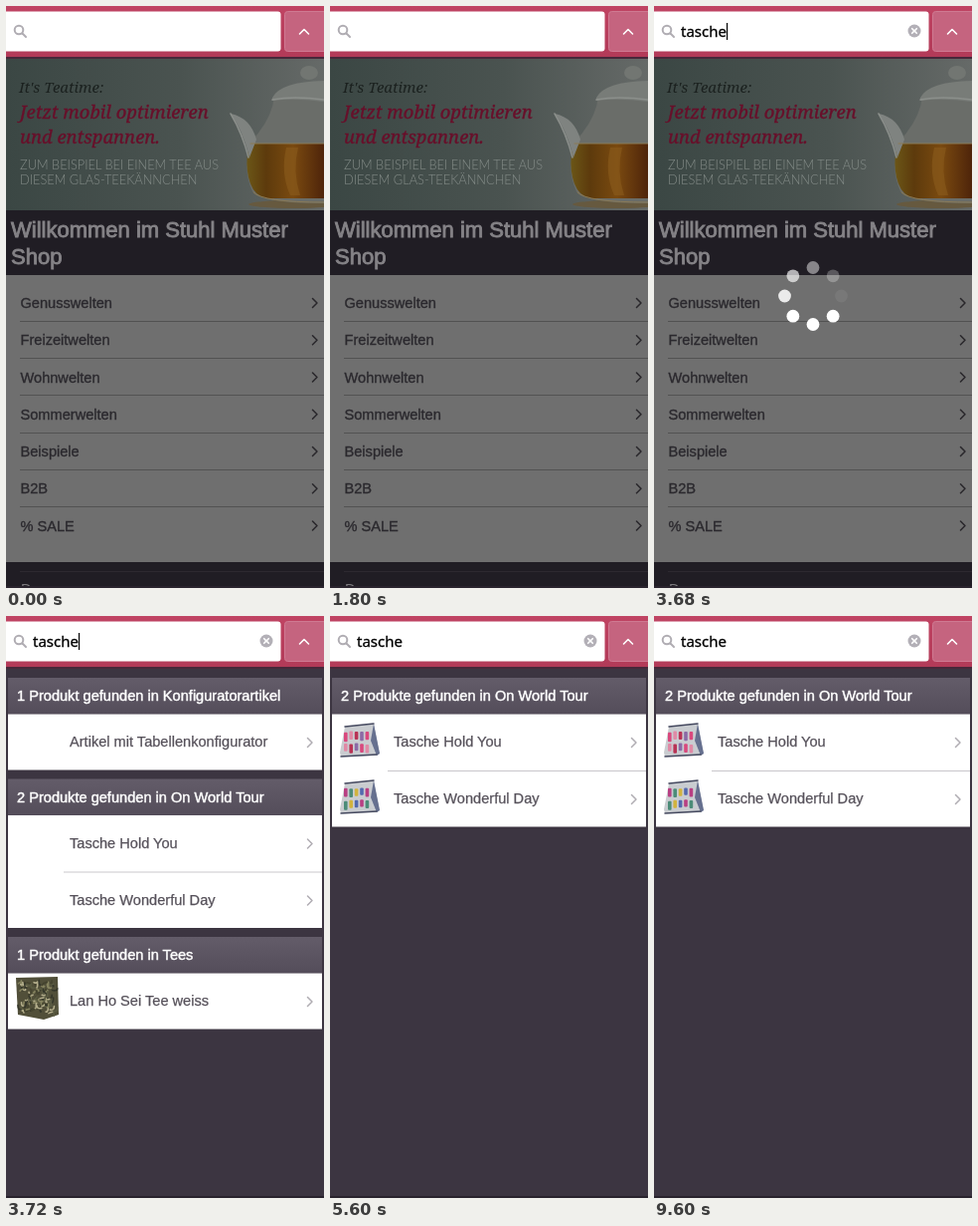
Animation of 320 by 584 pixels, one loop 9640 ms. Source, as an HTML page:

```html
<!DOCTYPE html>
<html lang="de">
<head>
<meta charset="utf-8">
<title>Mobile Suche</title>
<style>
html, body { margin: 0; width: 100%; height: 100%; overflow: hidden; background: #3c3541; }
svg { display: block; width: 320px; height: 584px; }
text { font: 14.6px "Liberation Sans", Arial, sans-serif; }
.head { fill: #fff; stroke: #fff; stroke-width: .45; }
.item { fill: #56515a; stroke: #56515a; stroke-width: .25; }
.menu { fill: #2b292e; stroke: #2b292e; stroke-width: .35; }
.title { font-size: 22px; fill: #858387; stroke: #858387; stroke-width: .9; }
.serif { font-family: "Noto Serif", serif; font-style: italic; }
.caps { font: 300 12.8px Lato, "Open Sans", sans-serif; fill: #848c88; }
.line { fill: none; stroke-linecap: round; stroke-linejoin: round; }
#query { font: 15px "Noto Sans", "Open Sans", sans-serif; stroke: #000; stroke-width: .3; }
</style>
</head>
<body>
<svg viewBox="0 0 320 584">
  <defs>
    <linearGradient id="wall"><stop stop-color="#3b4744"/><stop offset=".55" stop-color="#4a5350"/><stop offset="1" stop-color="#666a68"/></linearGradient>
    <linearGradient id="tea"><stop stop-color="#6b5617"/><stop offset=".25" stop-color="#5d3a0c"/><stop offset=".6" stop-color="#7a4a10"/><stop offset="1" stop-color="#4e240a"/></linearGradient>
    <linearGradient id="bar" x2="0" y2="1"><stop stop-color="#635c69"/><stop offset="1" stop-color="#544d5a"/></linearGradient>
    <linearGradient id="pink" x2="0" y2="1"><stop stop-color="#c04463"/><stop offset="1" stop-color="#b23a58"/></linearGradient>
  </defs>

  <g id="home">
    <rect y="52" width="320" height="153" fill="url(#wall)"/>
    <g id="teapot">
      <ellipse cx="290" cy="199" rx="46" ry="4" fill="#66593f"/>
      <path d="M270 90Q268 112 250 132Q236 160 248 186Q258 198 320 198V88Z" fill="#6a6d69"/>
      <path d="M246 138H320V193H262Q248 190 244 172Q240 154 246 138Z" fill="url(#tea)"/>
      <path d="M282 142Q276 168 286 190H296Q288 166 294 142Z" fill="#8a5c1c" opacity=".6"/>
      <path d="M226 108Q246 112 252 134L245 152Q238 124 226 108Z" fill="#7f8380"/>
      <path d="M268 92Q276 76 320 75V96Q292 92 268 95Z" fill="#787c78"/>
      <ellipse cx="305" cy="67" rx="9" ry="7" fill="#727672"/>
      <path class="line" d="M268 94Q290 90 320 94M226 108Q238 128 244 152" stroke="#8b8f8b" stroke-width="1.5"/>
      <path class="line" d="M246 138H320M249 187Q258 197 320 197" stroke="#8b7a55"/>
    </g>
    <text class="serif" x="13" y="87" style="font-size:15px" fill="#1b211f">It's Teatime:</text>
    <g fill="#680f2a" stroke="#680f2a" stroke-width=".35">
      <text class="serif" x="14" y="113" style="font-size:18.4px">Jetzt mobil optimieren</text>
      <text class="serif" x="14" y="138" style="font-size:18.4px">und entspannen.</text>
    </g>
    <text class="caps" x="14" y="164">ZUM BEISPIEL BEI EINEM TEE AUS</text>
    <text class="caps" x="14" y="179">DIESEM GLAS-TEEKÄNNCHEN</text>
    <rect y="205" width="320" height="65" fill="#201d24"/>
    <text class="title" x="5" y="232">Willkommen im Stuhl Muster</text>
    <text class="title" x="5" y="259">Shop</text>
    <rect y="270" width="320" height="288" fill="#6f6f6f"/>
    <g id="menu"></g>
    <rect y="558" width="320" height="26" fill="#201d24"/>
    <path d="M14 567.5H320" stroke="#2d2930"/>
    <text x="15" y="590" font-weight="bold" fill="#7b797d">Das</text>
  </g>
  <g id="found"></g>
  <g id="final"></g>
  <path d="M0 583H320" stroke="#29232d" stroke-width="2"/>
  <g id="spinner" fill="#fff"></g>

  <rect width="320" height="51" fill="url(#pink)"/>
  <rect y="51" width="320" height="2" fill="#47283a"/>
  <rect x="-4" y="5.5" width="280.5" height="40" rx="3" fill="#fff"/>
  <rect x="280.5" y="5.5" width="44" height="40" rx="3" fill="#c5647f" stroke="#cf7a92"/>
  <path class="line" d="M295.5 28L300 23.5L304.5 28" stroke="#fff" stroke-width="1.6"/>
  <g class="line" stroke="#b0adb3" stroke-width="2"><circle cx="13" cy="24" r="4.3"/><path d="M16.5 27.5L20 31"/></g>
  <text id="query" x="27" y="31"></text>
  <rect id="caret" y="17" width="1.2" height="17"/>
  <g id="clear"><circle cx="262" cy="25" r="6.5" fill="#b3b0b7"/><path class="line" d="M259.7 22.7l4.6 4.6m0-4.6l-4.6 4.6" stroke="#fff" stroke-width="1.6"/></g>
</svg>
<script>
const LOOP = 9640, BLINK = 1250 / 3, WORD = "tasche";
const $ = id => document.getElementById(id);
const show = (el, on) => el.style.display = on ? "" : "none";
const chevron = (x, y, color) =>
  `<path class="line" d="M${x} ${y - 4.5}l4.5 4.5l-4.5 4.5" stroke="${color}" stroke-width="1.5"/>`;

let seed = 7;
const rnd = () => (seed = seed * 16807 % 2147483647) / 2147483647;

// small bag: pale front, shaded side, rows of coloured patches
function bag(y, colors) {
  let s = `<g class="bag" transform="translate(10 ${y})">
    <path d="M5 3L34 0L40 30L37 32L1 33L0 29Z" fill="#c9ccd0"/>
    <path d="M34 0L40 30L37 32L31 17Z" fill="#66708f"/>
    <path class="line" d="M5 3L34 0M1 33L37 31" stroke="#45495f" stroke-width="1.5"/>`;
  for (let i = 0; i < 10; i++) {
    const x = 4 + i % 5 * 5.4, top = 7 + (i > 4) * 12 + rnd() * 2;
    s += `<rect x="${x}" y="${top}" width="3.6" height="${7 + rnd() * 3}" rx="1" fill="${colors[i % colors.length]}"/>`;
  }
  return s + "</g>";
}

// heap of tea leaves
function leaves(y) {
  const colors = ["#34362a", "#5b5c43", "#85835f", "#45442f", "#b3ad8b"];
  let s = `<path d="M10 ${y + 1}L52 ${y}L53 ${y + 38}L38 ${y + 43}L12 ${y + 38}Z" fill="#514f39"/>`;
  for (let i = 0; i < 110; i++) {
    const a = rnd() * 6.3, l = 2 + rnd() * 4, dx = l * Math.cos(a), dy = l * Math.sin(a);
    s += `<path class="line" d="M${15 + rnd() * 33} ${y + 5 + rnd() * 31}q${dx} 1 ${dx} ${dy}" stroke="${colors[i % 5]}" stroke-width="1.6"/>`;
  }
  return s;
}

function card(y, title, items) {
  const top = y + 36.5;
  let s = `<rect x="2" y="${y}" width="316" height="36.5" fill="url(#bar)"/>
    <text class="head" x="11" y="${y + 23}">${title}</text>
    <rect x="2" y="${top}" width="316" height="${items.length * 57 - 1}" fill="#fff"/>`;
  items.forEach((name, i) => {
    const row = top + i * 57;
    if (i) s += `<path d="M58 ${row}H318" stroke="#c9c7cb"/>`;
    s += `<text class="item" x="64" y="${row + 32.5}">${name}</text>` + chevron(303.5, row + 28.5, "#b0adb3");
  });
  return s;
}

const bags = y => bag(y, ["#d9487d", "#e08aa6", "#b83355", "#8b6aa5"]) +
  bag(y + 57, ["#b83f83", "#4c8c78", "#d1b33e", "#5369ae"]);
const tour = y => card(y, "2 Produkte gefunden in On World Tour", ["Tasche Hold You", "Tasche Wonderful Day"]) + bags(y + 46);
const page = '<rect y="51" width="320" height="533" fill="#3c3541"/>';

$("found").innerHTML = page + card(62, "1 Produkt gefunden in Konfiguratorartikel", ["Artikel mit Tabellenkonfigurator"]) +
  tour(163.5) + card(322, "1 Produkt gefunden in Tees", ["Lan Ho Sei Tee weiss"]) + leaves(362);
$("final").innerHTML = page + tour(62);

$("menu").innerHTML = ["Genusswelten", "Freizeitwelten", "Wohnwelten", "Sommerwelten", "Beispiele", "B2B", "% SALE"]
  .map((name, i) => {
    const y = 298 + i * 37.25;
    return `<text class="menu" x="14.5" y="${y + 5}">${name}</text>` + chevron(308.5, y, "#29272b") +
      (i < 6 ? `<path d="M14 ${Math.round(y + 17.9) + .5}H320" stroke="#525252"/>` : "");
  }).join("");

for (let i = 0; i < 8; i++) {
  const a = i * Math.PI / 4;
  $("spinner").innerHTML += `<circle cx="${160 + 28.5 * Math.cos(a)}" cy="${291 + 28.5 * Math.sin(a)}" r="6.4"/>`;
}
const dots = [...$("spinner").children];
const foundBags = $("found").querySelectorAll(".bag");
const finalBags = $("final").querySelectorAll(".bag");

function caretOn(t) {
  if (t < 40) return false;
  if (t >= 2400 && t < 3760) return true;
  const start = t < 2400 ? 960 : 4599;
  return (t - start + 3 * BLINK) % BLINK >= 168;
}

function draw() {
  const t = Math.floor(performance.now() % LOOP / 40) * 40;
  const typed = Math.max(0, Math.min(6, Math.floor((t - 2400) / 140) + 1));
  $("query").textContent = WORD.slice(0, typed);
  $("caret").setAttribute("x", 27 + (typed ? $("query").getComputedTextLength() : 0));
  show($("caret"), caretOn(t));
  show($("clear"), typed);
  show($("home"), t < 3720);
  show($("found"), t >= 3720 && t < 4000);
  show($("final"), t >= 4000);
  foundBags.forEach(b => show(b, t >= 3840));
  finalBags.forEach(b => show(b, t >= 4040));

  // each dot jumps to dim and brightens again, one eighth after its neighbour
  show($("spinner"), t >= 3200 && t < 3720);
  dots.forEach((dot, i) => {
    const p = ((t - 3680) / 433 + .04 - i / 8 + 4) % 1;
    dot.setAttribute("opacity", Math.max(.05, Math.min(1, p * 1.6)));
  });
  requestAnimationFrame(draw);
}
draw();
</script>
</body>
</html>
```
